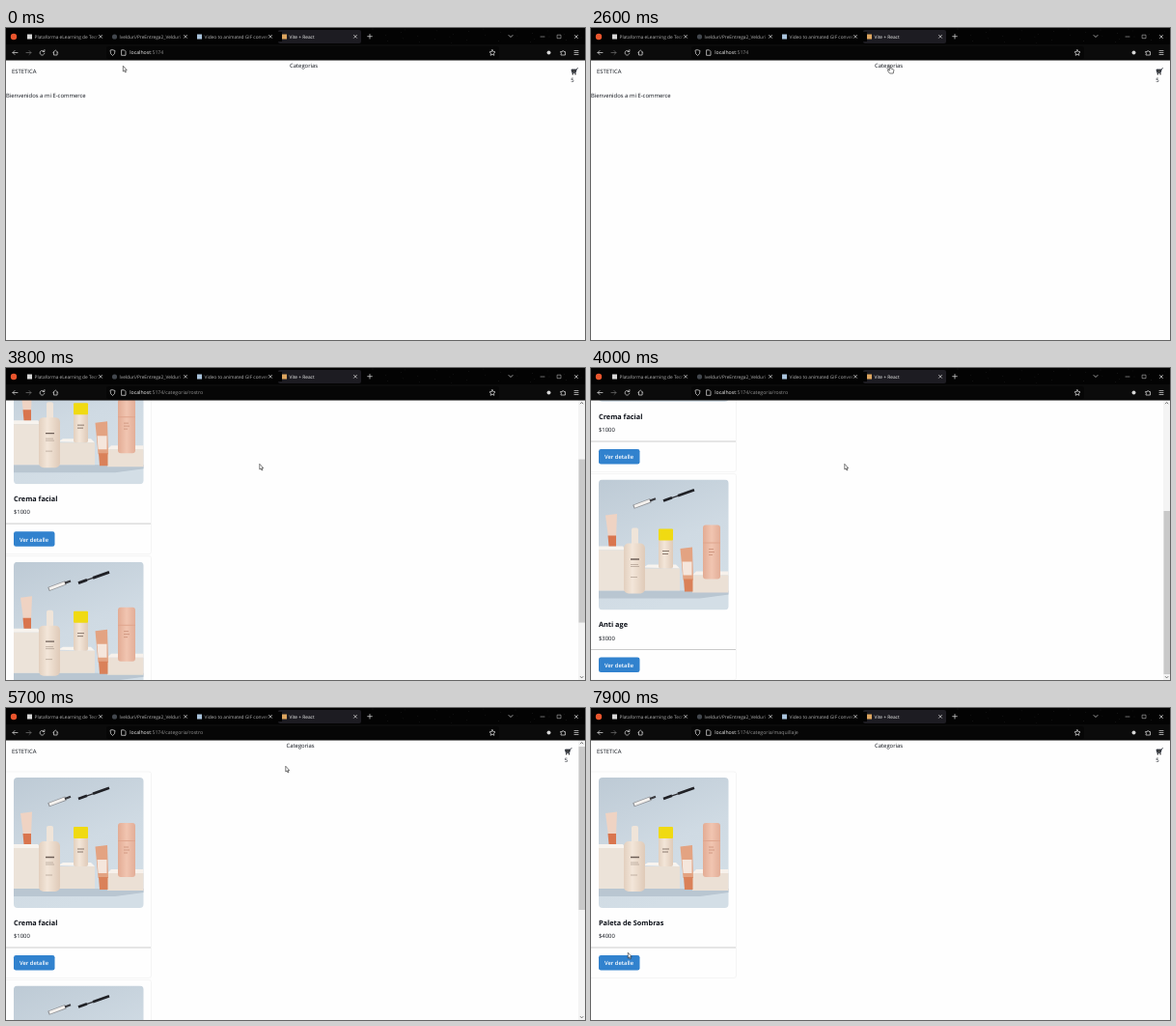
Animation, 600 px wide and 323 px high, one loop 8 s. Source, as an HTML page:

```html
<!DOCTYPE html>
<html lang="es">
<head>
<meta charset="utf-8">
<title>Tienda</title>
<style>
  html, body { margin: 0; width: 100%; height: 100%; overflow: hidden; background: #fff; }
  svg { display: block; width: 100vw; height: 100vh; }
  text { font: 5.9px "Open Sans", "Noto Sans", sans-serif; fill: #0c1018; text-rendering: geometricPrecision; white-space: pre; }
  .title { font-size: 7.3px; font-weight: 700; }
  .button { font-size: 5.8px; font-weight: 600; fill: #fff; }
  .tab { font-size: 4.8px; fill: #b4b4b4; }
  .url { font-size: 5.2px; fill: #929292; }
  .status { font-size: 4.65px; fill: #e4e4e4; }
  .bright { fill: #f4f4f4; }
  .icon { fill: none; stroke: #d6d6d6; stroke-width: .75; stroke-linecap: round; stroke-linejoin: round; }
</style>
</head>
<body>
<svg viewBox="0 0 600 323">
  <defs>
    <linearGradient id="sky" x2=".4" y2="1">
      <stop stop-color="#bdcad5"/><stop offset=".6" stop-color="#cfdae3"/><stop offset="1" stop-color="#d3dee6"/>
    </linearGradient>
    <linearGradient id="cream">
      <stop stop-color="#e2cfbe"/><stop offset=".4" stop-color="#f3e6d9"/><stop offset="1" stop-color="#dfcab8"/>
    </linearGradient>
    <linearGradient id="pink">
      <stop stop-color="#e3ab93"/><stop offset=".5" stop-color="#f1c5b1"/><stop offset="1" stop-color="#e2ad97"/>
    </linearGradient>
    <linearGradient id="fade">
      <stop stop-color="#030303" stop-opacity="0"/><stop offset=".8" stop-color="#030303"/>
    </linearGradient>
    <clipPath id="frame"><rect width="134.5" height="135" rx="4"/></clipPath>
    <clipPath id="view"><path d="M0 33H600V323H0z"/></clipPath>
    <g id="photo" clip-path="url(#frame)">
      <path fill="url(#sky)" d="M0 0H135V135H0z"/>
      <path fill="#b9c6d1" d="M0 115H135V119L105 123H0z"/>
      <path fill="#f7f3ee" d="M0 69H25L28 73H0z"/>
      <path fill="#ece3d9" d="M0 73H28V115H0z"/>
      <path fill="#f8f4ef" d="M46 91L51 88H80L84 92z"/>
      <path fill="#eae0d5" d="M46 92H84V115H46z"/>
      <path fill="#f7f1eb" d="M97 99L101 95H135V99z"/>
      <path fill="#ebe0d5" d="M97 99H135V117H97z"/>
      <path fill="#efd3c3" d="M7 37L19 35.500L18 60H10z"/>
      <path fill="#d9754e" d="M9.500 58H18V69H10.500z"/>
      <rect x="34" y="50" width="7" height="20" rx="2" fill="#efe4d9"/>
      <rect x="26" y="66" width="22" height="52" rx="5" fill="url(#cream)"/>
      <path stroke="#6f6058" stroke-width="1.300" d="M33 82.500H42"/>
      <path stroke="#a39084" stroke-width=".6" d="M33 88H41M33 90H42M33 101H40"/>
      <rect x="62" y="61" width="15" height="31" rx="2" fill="url(#cream)"/>
      <rect x="62" y="51" width="15" height="12" rx="1" fill="#f0da12"/>
      <path stroke="#7e6d61" stroke-width=".9" d="M66 74H73M66 77H72"/>
      <path fill="#e3a382" d="M84.500 71.500L97 70L98 104H87.500z"/>
      <path fill="#f5e6dc" d="M86.500 85H96.500V99H87.500z"/>
      <path fill="#da8159" d="M88 103H97.500V116H89z"/>
      <rect x="108" y="47" width="18" height="56" rx="3" fill="url(#pink)"/>
      <path fill="#dfa58d" d="M108 65H126V66H108z"/>
      <path stroke="#c98e77" stroke-width=".8" d="M114 72H119M114 75H120M114 78H118"/>
      <path stroke="#8c8f94" stroke-width="4.400" d="M36 28.300L54 21.600"/>
      <path stroke="#f4f1ee" stroke-width="3" d="M37 27.900L53 21.900"/>
      <path stroke="#3a3a3e" stroke-width="2.200" d="M53 22L59 19.800"/>
      <path stroke="#202126" stroke-width="2.800" d="M67 22L76 18.800M82 16.800L99 10.800"/>
      <path stroke="#2d2d32" stroke-width="1.300" d="M76 18.800L82 16.800"/>
    </g>
    <path id="close" class="icon" stroke-width=".6" d="M-1.500 -1.500L1.500 1.500M1.500 -1.500L-1.500 1.500"/>
  </defs>

  <path fill="#fefefe" d="M0 0H600V323H0z"/>
  <g clip-path="url(#view)">
    <g id="page">
      <text x="6" y="47">ESTETICA</text>
      <text id="heading" y="40.800">Categorias</text>
      <g id="cart">
        <path d="M586 43H591L590.300 46.300H586.700z" fill="#444" stroke="#1a202c" stroke-width=".8"/>
        <path d="M590.700 43.700L592.300 41.500H592.800" fill="none" stroke="#1a202c" stroke-width=".8"/>
        <circle cx="587.300" cy="47.700" r=".7"/><circle cx="590" cy="47.700" r=".7"/>
        <text x="585.200" y="56.200">5</text>
      </g>
      <text id="welcome" x="0" y="72.200">Bienvenidos a mi E-commerce</text>
      <g id="cards"></g>
    </g>
    <g id="bar">
      <path fill="#f4f4f4" d="M593 33H600V323H593z"/>
      <rect id="thumb" x="593.500" width="6.500" height="169" fill="#c9c9c9"/>
      <path fill="none" stroke="#555" stroke-width=".8" d="M595 37.200L596.600 35.500L598.200 37.200M595 319.200L596.600 320.900L598.200 319.200"/>
    </g>
    <g id="menu"></g>
    <g id="status">
      <path fill="#3b3b3f" d="M0 315.500H67Q69 315.500 69 317.500V323H0z"/>
      <text id="link" class="status" x="1" y="321"></text>
    </g>
  </g>

  <path fill="#030303" d="M0 0H600V33.400H0z"/>
  <g id="specks" fill="#2b2b2b"></g>
  <path fill="#0b0b0b" d="M0 17H600V33H0z"/>
  <rect x="282" y="2" width="86" height="14" rx="2" fill="#1d1c22"/>
  <rect x="104" y="19" width="407" height="13" rx="2" fill="#060606"/>
  <circle cx="8" cy="9" r="3.200" fill="#e8552d"/>
  <g id="tabs"></g>
  <g class="icon">
    <path d="M377 6.500V11M374.700 8.700H379.300M521 7.500L523 9.500L525 7.500"/>
    <path stroke-width=".5" d="M554 9H558M571.500 7.200H575V10.700H571.500z"/>
    <path d="M12 25.500H7M9 23.500L7 25.500L9 27.500"/>
    <path stroke="#6b6b6b" d="M21 25.500H26M24 23.500L26 25.500L24 27.500"/>
    <path d="M39.500 24.300A2.400 2.400 0 1 0 39.900 26.200M39.900 22.500V24.500H38"/>
    <path d="M48.700 25.500L51.300 23L53.900 25.500M49.500 25V28H53.100V25"/>
    <path d="M110.500 22.700L113 23.500Q113 27.500 110.500 28.500Q108 27.500 108 23.500z"/>
    <path d="M120 22.800H122.500L124 24.300V28.300H120z"/>
    <path d="M504 22.600L504.900 24.500L507 24.800L505.500 26.200L505.900 28.300L504 27.300L502.100 28.300L502.500 26.200L501 24.800L503.100 24.500z"/>
    <path d="M575 24.500H576.500Q577 22 578 24.500H579.500V28H575V26.800Q576.700 26.200 575 25.500zM589 23.500H593M589 25.500H593M589 27.500H593"/>
  </g>
  <circle cx="562.500" cy="25.500" r="2" fill="#d6d6d6"/>
  <use href="#close" x="591" y="9"/>
  <text class="url" x="128.300" y="27.300"><tspan class="bright">localhost</tspan>:5174<tspan id="path"></tspan></text>

  <g id="arrow"><path fill="#fff" stroke="#222" stroke-width=".6" d="M.3 .3V6L1.600 4.900L2.500 7L3.400 6.600L2.600 4.600H4.200z"/></g>
  <g id="hand"><path fill="#fff" stroke="#222" stroke-width=".6" stroke-linejoin="round" d="M-.7 .7Q0 -.3 .7 .7V3L3.300 3.700Q4 4 3.800 5L3.200 8H-.5L-2.700 5Q-2.500 4 -1.500 4.500L-.7 5.200z"/></g>
</svg>
<script>
const LOOP = 8000, TOP = 46, ROW = 14.1, MAX_SCROLL = 172;
const $ = id => document.getElementById(id);
const clamp = v => Math.max(0, Math.min(1, v));
const ramp = (t, a, b) => clamp((t - a) / (b - a));
const smooth = p => p * p * (3 - 2 * p);
const show = (id, on) => $(id).style.display = on ? '' : 'none';
const move = (id, x, y, scale = 1) => $(id).setAttribute('transform', `translate(${x} ${y}) scale(${scale})`);

const tabs = [
  [22, 'Plataforma eLearning de Tecnoaula', '#d8d8d8'],
  [110, 'lvelduri/PreEntrega2_Velduri', '#41464c'],
  [198, 'Video to animated GIF converter', '#a9c3dc'],
  [286, 'Vite + React', '#dda55f']
];
$('tabs').innerHTML = tabs.map(([x, label, color], i) => `
  ${i == 1 ? `<circle cx="${x + 2.5}" cy="9" r="2.600" fill="${color}"/>`
           : `<rect x="${x}" y="6.500" width="5" height="5" fill="${color}"/>`}
  <text class="tab ${i == 3 ? 'bright' : ''}" x="${x + 7.6}" y="10.700">${label}</text>
  ${i < 3 ? `<path fill="url(#fade)" d="M${x + 65} 4H${x + 88}V14H${x + 65}z"/>
             <path fill="#030303" d="M${x + 73} 4H${x + 88}V14H${x + 73}z"/>` : ''}
  <use href="#close" x="${x + 76}" y="8.800"/>`).join('');

// Faint stars of the browser theme
$('specks').innerHTML = Array.from({ length: 30 }, (_, i) =>
  `<circle cx="${380 + i * 83.7 % 218}" cy="${1 + i * 5.3 % 15}" r=".4"/>`).join('');

const card = ([title, price], i) => `<g transform="translate(0 ${i * 215.5})">
  <path fill="none" stroke="#f3f3f3" stroke-width=".8" d="M0 66H148Q150.500 66 150.500 68V277Q150.500 279.500 148 279.500H0"/>
  <use href="#photo" x="8" y="72"/>
  <text class="title" x="8" y="224.500">${title}</text>
  <text x="8" y="238">$${price}</text>
  <path stroke="#b5b5b5" stroke-width=".7" d="M0 248H150"/>
  <rect x="8" y="256" width="42.500" height="15.600" rx="2.300" fill="#3182ce"/>
  <text class="button" x="14" y="266.400">Ver detalle</text></g>`;

$('menu').innerHTML = `<rect width="87.500" height="63" rx="2.300" fill="#fff" stroke="#e2e8f0" stroke-width=".6"/>
  <rect id="row" width="87.500" height="${ROW}" fill="#edf2f7"/>` +
  ['Rostro', 'Corporal', 'Maquillaje', 'Solar'].map((s, i) =>
    `<text x="5" y="${13 + i * ROW}">${s}</text>`).join('');

const routes = [
  { start: 0, path: '', cards: [] },
  { start: 3045, path: '/categoria/rostro', cards: [['Crema facial', 1000], ['Anti age', 3000]] },
  { start: 6900, path: '/categoria/maquillaje', cards: [['Paleta de Sombras', 4000]] }
];
const menus = [
  { open: 2650, close: 3045, x: 294 },
  { open: 6150, close: 6900, x: 290.8 }
];
// time, x, y
const pointer = [
  [0, 121, 39], [300, 121, 39], [900, 230, 60], [1300, 331, 112], [1600, 333, 98], [1900, 330, 88],
  [2450, 310, 39], [2660, 310, 39], [2880, 312, 56.5], [3250, 312, 56.5], [3600, 262.5, 99],
  [5400, 262.5, 99], [5900, 304, 39], [6200, 304, 39], [6450, 305, 62], [6650, 304, 86],
  [7150, 304, 86], [7700, 45, 250], [7900, 38, 253], [LOOP, 38, 253]
];

function pointerAt(t) {
  const i = pointer.findIndex(k => k[0] > t), [a, x, y] = pointer[i - 1], [b, u, v] = pointer[i];
  const p = smooth(ramp(t, a, b));
  return [x + (u - x) * p, y + (v - y) * p];
}

let shown;
function setRoute(route) {
  if (route == shown) return;
  shown = route;
  const long = route.cards.length > 1;
  $('cards').innerHTML = route.cards.map(card).join('');
  $('path').textContent = route.path;
  $('heading').setAttribute('x', long ? 290.5 : 294);
  move('cart', long ? -6.5 : 0, 0);
  show('welcome', !route.cards.length);
  show('bar', long);
}

function draw(t) {
  setRoute(routes.findLast(r => t >= r.start));
  const scroll = MAX_SCROLL * (smooth(ramp(t, 3650, 3950)) - smooth(ramp(t, 4500, 4865)));
  move('page', 0, -scroll);
  $('thumb').setAttribute('y', 40 + scroll * .628);

  const [x, y] = pointerAt(t);
  const menu = menus.find(m => t >= m.open && t < m.close + 100);
  const row = Math.floor((y - TOP - 3.5) / ROW);
  show('menu', menu);
  if (menu) {
    const opening = 1 - (1 - ramp(t, menu.open, menu.open + 200)) ** 2;
    const shownPart = opening - ramp(t, menu.close, menu.close + 100);
    move('menu', menu.x, TOP, .8 + .2 * shownPart);
    $('menu').setAttribute('opacity', shownPart);
    show('row', row >= 0 && row < 4);
    $('row').setAttribute('y', 3.5 + row * ROW);
  }

  const first = t > 2950 && t < 3350, second = t > 6800 && t < 7100;
  show('status', first || second);
  $('link').textContent = 'localhost:5174' + routes[first ? 1 : 2].path;

  const onHeading = x > 289 && x < 325 && y > 34 && y < 44;
  const hand = onHeading || menu && row >= 0;
  show('hand', hand);
  show('arrow', !hand);
  move(hand ? 'hand' : 'arrow', x, y);
}

const begin = performance.now();
function tick() {
  draw((performance.now() - begin) % LOOP);
  requestAnimationFrame(tick);
}
tick();
</script>
</body>
</html>
```
